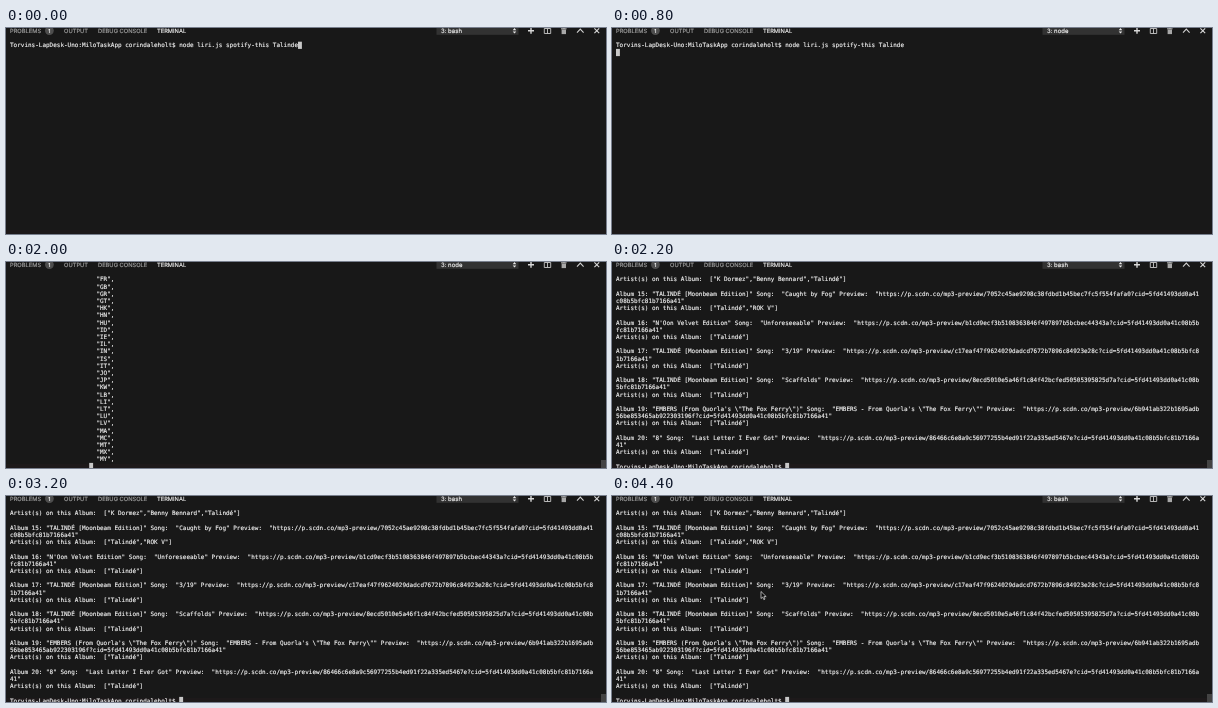
An HTML page with a canvas for the animation above (5000 ms loop, 600 px wide and 206 px high).

```html
<!DOCTYPE html>
<html lang="en">
<head>
<meta charset="utf-8">
<title>Terminal session</title>
<style>
  html, body { margin: 0; width: 600px; height: 206px; overflow: hidden; background: #181818; }
  canvas { display: block; }
</style>
</head>
<body>
<canvas id="stage" width="600" height="206"></canvas>
<script>
const ctx = document.getElementById('stage').getContext('2d');
const LOOP = 5000, COLS = 162, CHAR = 3.6, ROW = 7.2, LEFT = 4, TOP = 13.7;
const MONO = '59.8px "DejaVu Sans Mono", monospace';
const SANS = 'Inter, sans-serif';

const prompt = 'Torvins-LapDesk-Uno:MiloTaskApp corindaleholt$ ';
const command = prompt + 'node liri.js spotify-this Talinde';
const greeting = [command, 'this is loaded', 'You want me to spotify this: Talinde'];
const markets = 'FR GB GR GT HK HN HU ID IE IL IN IS IT JO JP KW LB LI LT LU LV MA MC MT MX MY'
  .split(' ').map(code => ' '.repeat(24) + `"${code}",`);

const deluxe = 'TALINDÉ [Moonbeam Edition]';
const film = '\\"The Fox Ferry\\"';
const albums = [
  [deluxe, 'Caught by Fog', '7052c45ae9298c38fdbd1b45bec7fc5f554fafa0', '"Talindé","ROK V"'],
  ["N'Oon Velvet Edition", 'Unforeseeable', 'b1cd9ecf3b5108363846f497897b5bcbec44343a'],
  [deluxe, '3/19', 'c17eaf47f9624029dadcd7672b7896c84923e28c'],
  [deluxe, 'Scaffolds', '8ecd5010e5a46f1c84f42bcfed50505395825d7a'],
  [`EMBERS (From Quorla's ${film})`, `EMBERS - From Quorla's ${film}`, '6b941ab322b1695adb56be853465ab922303196f'],
  ['8', 'Last Letter I Ever Got', '86466c6e8a9c56977255b4ed91f22a335ed5467e'],
];

const artistLine = names => `Artist(s) on this Album:  [${names}]`;
const wrap = line => line.match(new RegExp(`.{1,${COLS}}`, 'g'));

const results = [artistLine('"K Dormez","Benny Bennard","Talindé"'), ''];
albums.forEach(([album, song, id, artists = '"Talindé"'], i) => {
  const url = `https://p.scdn.co/mp3-preview/${id}?cid=5fd41493dd0a41c08b5bfc81b7166a41`;
  results.push(
    ...wrap(`Album ${15 + i}: "${album}" Song:  "${song}" Preview:  "${url}"`),
    artistLine(artists), '');
});
results.push(prompt);

// [start time, lines, cursor column, cursor row]
const screens = [
  [0, [command], 80, 0],
  [600, [command], 0, 1],
  [1200, greeting, 0, 3],
  [2000, markets, 22, 26],
  [2200, results, 47, 26],
];

function rect(x, y, w, h, color) {
  ctx.fillStyle = color;
  ctx.fillRect(x, y, w, h);
}

// Text is laid out at ten times its size to keep fractional advances;
// a hairline stroke gives the slightly heavier screen weight.
function text(str, x, y, font, color) {
  ctx.save();
  ctx.translate(x, y);
  ctx.scale(0.1, 0.1);
  ctx.font = font;
  ctx.textRendering = 'geometricPrecision';
  ctx.fillStyle = ctx.strokeStyle = color;
  ctx.lineWidth = 1.6;
  ctx.fillText(str, 0, 0);
  ctx.strokeText(str, 0, 0);
  ctx.restore();
}

const label = (str, x, color, size = 57.5) => text(str, x, 4.6, `${size}px ${SANS}`, color);

function line(path, color = '#c8c8c8', width = 0.9) {
  ctx.strokeStyle = color;
  ctx.lineWidth = width;
  ctx.stroke(new Path2D(path));
}

function fill(path, color) {
  ctx.fillStyle = color;
  ctx.fill(new Path2D(path));
}

function drawHeader(process) {
  label('PROBLEMS', 4, '#a0a0a0');
  label('OUTPUT', 58, '#a0a0a0');
  label('DEBUG CONSOLE', 92, '#a0a0a0');
  label('TERMINAL', 151, '#f0f0f0');
  fill('M39 2.6a4.4 4.4 0 1 0 8.8 0a4.4 4.4 0 1 0 -8.8 0z', '#4d4d4d');
  label('1', 42.3, '#fff', 54);

  rect(430.5, -1, 82, 7.8, '#323232');
  label('3: ' + process, 435, '#f4f4f4', 60);
  fill('M506.7 2.2h3.6l-1.8 -2.2zM506.7 3.4h3.6l-1.8 2.2z', '#e8e8e8');

  line('M522 2.8h6M525 -.2v6', '#d8d8d8', 1.4);
  line('M538.3 .5v5h6.4v-5zM541.5 .5v5');
  line('M555 .8h5.6M556.7 0h2.2');
  fill('M555.6 1.5h4.4v4.6h-4.4z', '#a8a8a8');
  line('M571 4.6l3.3 -3.5l3.3 3.5', '#d0d0d0', 1.1);
  line('M588.4 .4l4.8 4.8M593.2 .4l-4.8 4.8', '#d8d8d8', 1.1);
}

function drawPointer(t) {
  if (t < 3800) return;
  const k = Math.min(3, Math.floor((t - 3800) / 200)) / 3;
  ctx.save();
  ctx.translate(172.5 - 23.5 * k, 26.5 + 69 * k);
  const arrow = 'M0 0V7L1.7 5.5L2.8 8.1L4 7.6L2.9 5.1H5.2Z';
  fill(arrow, '#080808');
  line(arrow, '#e8e8e8', 0.7);
  ctx.restore();
}

function draw(t) {
  rect(0, 0, 600, 206, '#181818');
  rect(0, 202, 600, 4, '#1d191a');
  drawHeader(t >= 800 && t < 2200 ? 'node' : 'bash');

  const [, lines, col, row] = screens.findLast(([start]) => t >= start);
  lines.forEach((str, i) => text(str, LEFT, TOP + i * ROW + 5.65, MONO, '#f0f0f0'));
  rect(LEFT + col * CHAR, TOP + row * ROW, CHAR + 0.3, ROW, '#c8c8c8');
  if (t >= 2000) rect(595, 198, 5, 8, '#434343');
  drawPointer(t);
}

const begin = performance.now();
function tick() {
  draw((performance.now() - begin) % LOOP);
  requestAnimationFrame(tick);
}
tick();
</script>
</body>
</html>
```
